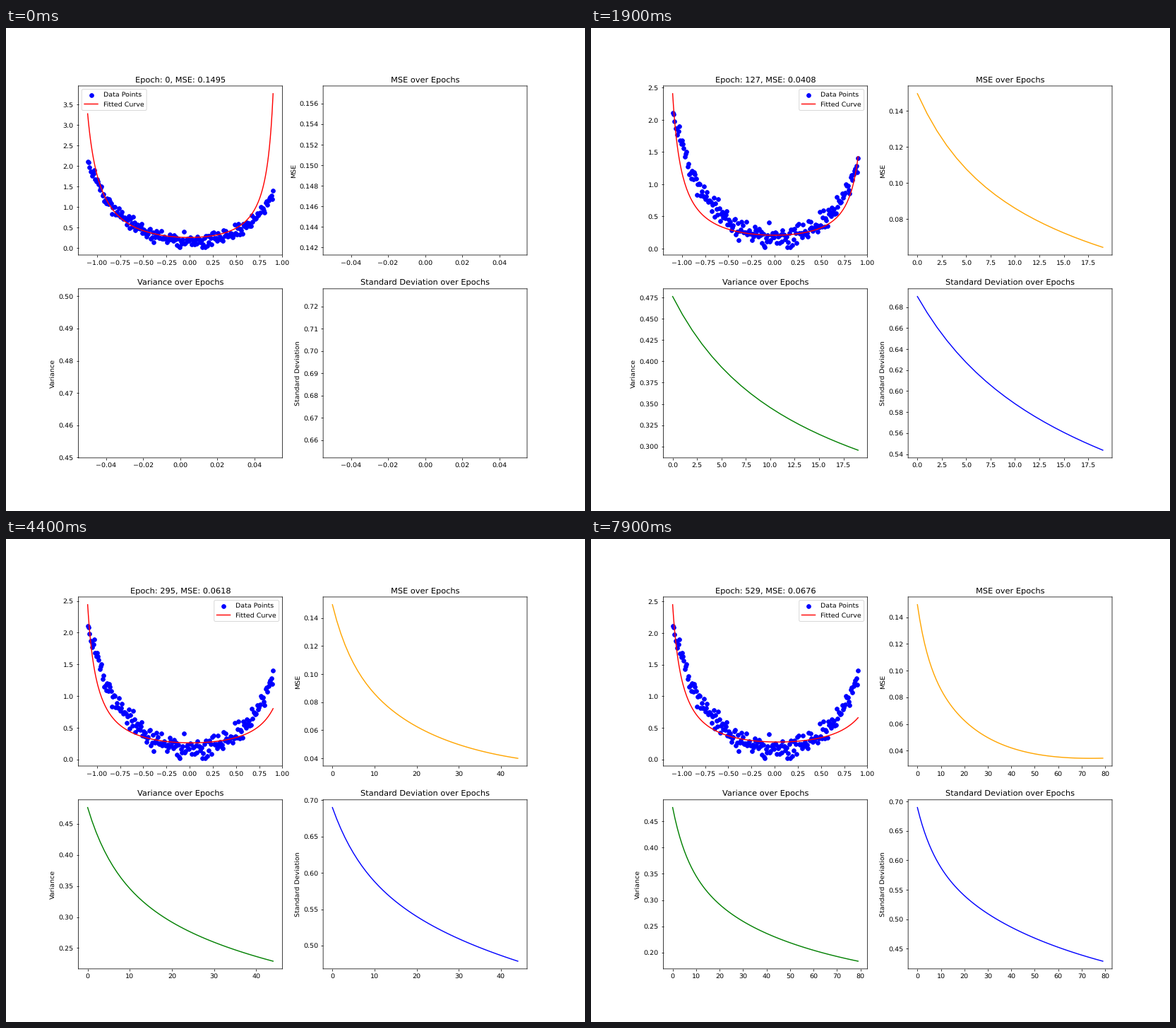
Write a matplotlib script that moves like this. It is 820x683 px and loops after 8000 ms.

```python
import numpy as np
import matplotlib.pyplot as plt
from matplotlib.animation import FuncAnimation

FRAMES = 80
DPI = 820 / 12
X0, X1 = -1.1, 0.9
plt.rcParams.update({"text.hinting": "none", "path.snap": False})


def relax(t, rest, *terms):
    """Settle to rest along a sum of (amount, time constant) decays."""
    return rest + sum(a * np.exp(-t / tau) for a, tau in terms)


def mse_at(t):
    return relax(t, 0.06839, (-0.1054, 107), (0.1303, 38),
                 (0.0275, 11), (0.0287, 4))


def std_at(t):
    return relax(t, 0.3534, (0.232, 70), (0.0722, 11), (0.0324, 5))


def curve(x, t):
    """Rational fit pinned to its two end heights while it trains."""
    y0 = relax(t, 2.45, (-0.15, 100), (0.98, 14))
    y1 = relax(t, 0.645, (2.63, 105), (0.495, 20))
    p = relax(t, 0.28, (-0.235, 110), (0.215, 28))
    a = relax(t, 0, (-0.05, 200))
    b = relax(t, 0.1, (0.3, 80))

    def top(x):
        return p + a * x + b * x**2

    c, d = np.linalg.solve([[X0, X0**2], [X1, X1**2]],
                           [top(X0) / y0 - 1, top(X1) / y1 - 1])
    return top(x) / (1 + c * x + d * x**2)


rng = np.random.default_rng(7)
xs = np.linspace(X0, X1, 200)
data = 0.19 + 0.8 * xs**2 + 0.65 * xs**4 + rng.normal(0, 0.095, xs.size)
data = np.maximum(data, 0.02)

steps = np.arange(FRAMES)
epochs = np.linspace(0, 999, 150).astype(int)
std = std_at(steps)
history = [mse_at(steps), std**2, std]

# The tiny margin keeps the pixel size from rounding down.
fig, axes = plt.subplots(2, 2, dpi=DPI,
                         figsize=((820 + 1e-4) / DPI, (683 + 1e-4) / DPI))
fit_ax, *hist_axes = axes.flat
fit_ax.scatter(xs, data, color="blue", label="Data Points")
fit_line, = fit_ax.plot(xs, curve(xs, 0), color="red", label="Fitted Curve")
fit_ax.set_xlim(X0 - 0.1, X1 + 0.1)
fit_ax.legend()

lines = []
for ax, name, color in zip(hist_axes,
                           ["MSE", "Variance", "Standard Deviation"],
                           ["orange", "green", "blue"]):
    ax.set_title(f"{name} over Epochs")
    ax.set_ylabel(name)
    lines += ax.plot([], [], color=color)


def update(i):
    epoch = epochs[i]
    y = curve(xs, epoch)
    fit_line.set_ydata(y)
    lo, hi = min(data.min(), y.min()), max(data.max(), y.max())
    pad = 0.05 * (hi - lo)
    fit_ax.set_ylim(lo - pad, hi + pad)
    fit_ax.set_title(f"Epoch: {epoch}, MSE: {mse_at(epoch):.4f}")
    for ax, line, values in zip(hist_axes, lines, history):
        line.set_data(steps[:i + 1], values[:i + 1])
        ax.relim()
        ax.autoscale_view()
    return [fit_line, *lines]


anim = FuncAnimation(fig, update, frames=FRAMES, interval=100, repeat=True)
plt.show()
```
